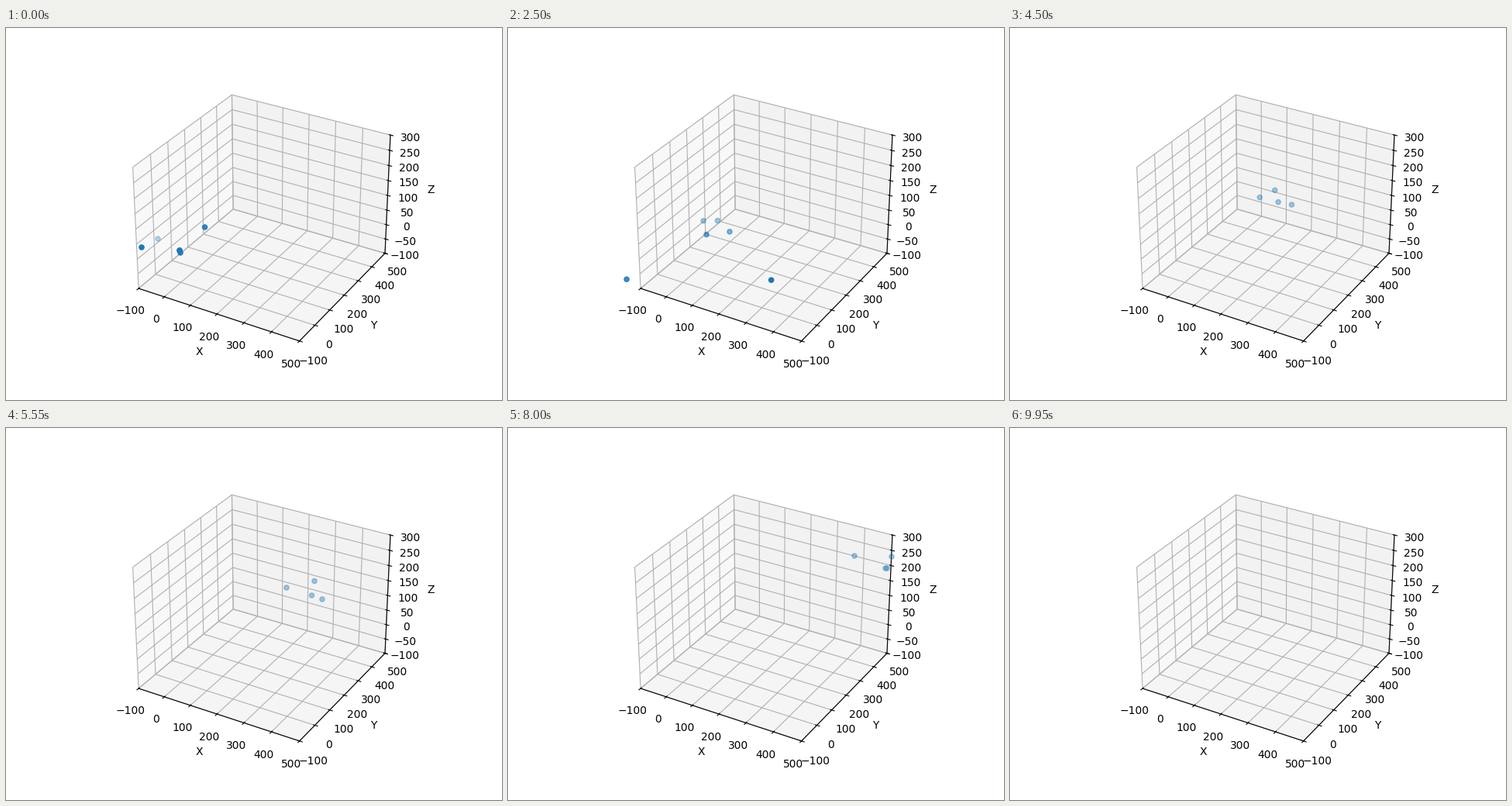
Recreate the animation shown at these times as a matplotlib script. Size 640x480 px, loop 10000 ms.

```python
import numpy as np
import matplotlib.pyplot as plt
from matplotlib.animation import FuncAnimation
from matplotlib.colors import to_rgb

W, H = 640, 480
FRAMES, STEP = 200, 50

fig = plt.figure(figsize=(W / 100, H / 100), dpi=100)
box = fig.add_subplot(projection="3d")
box.set(xlim=(-100, 500), ylim=(-100, 500), zlim=(-100, 300),
        xlabel="X", ylabel="Y", zlabel="Z")

# Flat layer in stage pixels that clips the dots to the square of the 3D view
SIDE, LEFT, TOP = 369.6, 143.2, 57.6
layer = fig.add_axes([LEFT / W, 1 - (TOP + SIDE) / H, SIDE / W, SIDE / H])
layer.set(xlim=(LEFT, LEFT + SIDE), ylim=(TOP + SIDE, TOP))
layer.axis("off")

TURNS = np.array([0, 1.55, 3.55, 5.55, 6.9, 8])  # seconds at each waypoint


def fly(t, *points):
    """Smooth path through the waypoints, then straight on at the last speed."""
    points = np.array(points, float)
    times = TURNS[:len(points)]
    speed = np.gradient(points, times, axis=0)
    inside = np.minimum(t, times[-1])
    k = np.clip(np.searchsorted(times, inside, side="right") - 1,
                0, len(times) - 2)
    h = (times[k + 1] - times[k])[:, None]
    u = (inside - times[k])[:, None] / h
    return ((1 + 2 * u) * (1 - u) ** 2 * points[k]
            + u * (1 - u) ** 2 * h * speed[k]
            + u ** 2 * (3 - 2 * u) * points[k + 1]
            + u ** 2 * (u - 1) * h * speed[k + 1]
            + (t - inside)[:, None] * speed[-1])


def recede(t, reach):
    """Opacity of a bird that moves into the distance around time reach."""
    return .39 + .5 * np.exp(-(t / reach) ** 4)


t = np.arange(FRAMES) * STEP / 1000

# Four birds keep together and cross to the far right corner
trailing = fly(t, (224, 287), (230.5, 266), (286, 230),
               (362, 206), (399, 183), (447, 165))
upper = fly(t, (256.5, 257), (265, 266), (289, 223),
            (398, 197.5), (409, 184), (489, 181))
lower = fly(t, (224, 287), (231.5, 289), (296, 237),
            (394.5, 216), (408, 205.5), (487, 181))
leading = fly(t, (225, 290), (262, 285), (318, 236),
              (408, 221), (421.5, 198), (495, 166))

# Two birds break away, one to each side
stray = fly(t, (196, 272), (170, 286), (134, 378))
near = fly(t, (175, 283), (262, 308), (435, 345))

tracks = np.stack([trailing, upper, lower, leading, stray, near], axis=1)
alphas = np.stack([recede(t, 1.7), recede(t, 1.1), recede(t, 2.8),
                   recede(t, 2.4), np.minimum(.3 + .22 * t, 1),
                   np.ones(FRAMES)], axis=1)

colors = np.tile([*to_rgb("tab:blue"), 1.0], (tracks.shape[1], 1))
dots = layer.scatter(*tracks[0].T, s=20, c=colors)


def draw(i):
    colors[:, 3] = alphas[i]
    dots.set_offsets(tracks[i])
    dots.set_facecolor(colors)
    dots.set_edgecolor(colors)
    return [dots]


anim = FuncAnimation(fig, draw, frames=FRAMES, interval=STEP,
                     init_func=lambda: draw(0), repeat=True, repeat_delay=0)
plt.show()
```
